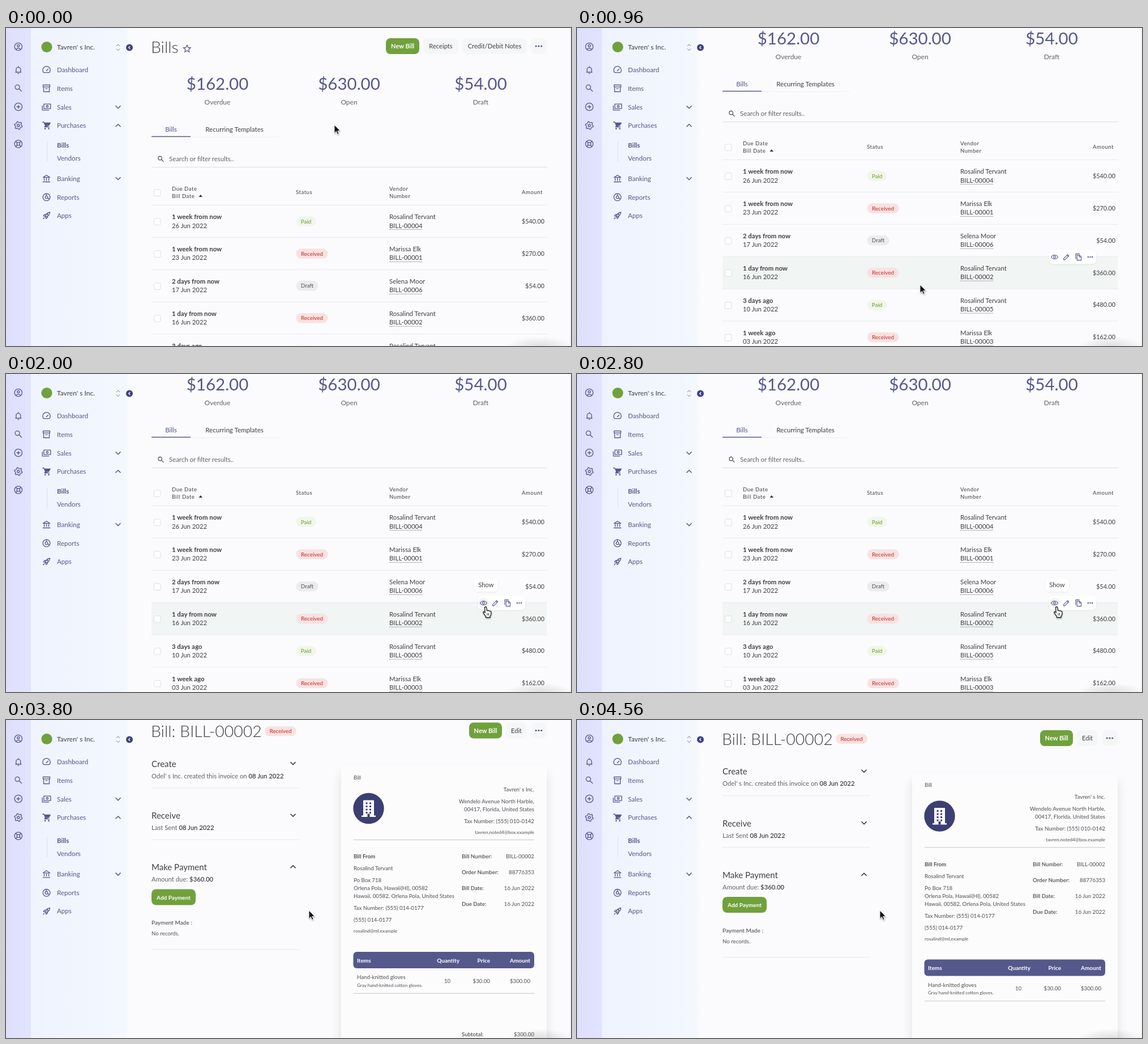
Write an HTML page that moves like this. It is 998 px wide and 561 px high and loops after 5 s.

```html
<!DOCTYPE html>
<html lang="en">
<head>
<meta charset="utf-8">
<title>Bills</title>
<style>
html, body { margin: 0; width: 100%; height: 100%; overflow: hidden; background: #fbfbfd; }
svg { display: block; width: 998px; height: 561px; }
text { font-family: Lato, "Open Sans", sans-serif; white-space: pre; }
</style>
</head>
<body>
<svg id="stage" viewBox="0 0 998 561" xmlns="http://www.w3.org/2000/svg"></svg>
<script>
const NAVY = '#55588b', DARK = '#3f3f43', GREY = '#626267', GREEN = '#70a13c', LINE = '#e9e9ee';
const COMPANY = "Tavren' s Inc.", VENDOR = 'Rosalind Tervant';

// Drawing helpers
const text = (x, y, s, size = 11.4, color = DARK, weight = 400, anchor = 'start', more = '') =>
  `<text x="${x}" y="${y}" font-size="${size}" fill="${color}" font-weight="${weight}" text-anchor="${anchor}" ${more}>${s}</text>`;
const rect = (x, y, w, h, fill, r = 0, more = '') =>
  `<rect x="${x}" y="${y}" width="${w}" height="${h}" rx="${r}" fill="${fill}" ${more}/>`;
const circle = (x, y, r, fill, more = '') => `<circle cx="${x}" cy="${y}" r="${r}" fill="${fill}" ${more}/>`;
const hline = (x1, x2, y, color = LINE, w = 1, more = '') =>
  `<path d="M${x1} ${y}H${x2}" stroke="${color}" stroke-width="${w}" ${more}/>`;
const ring = (x, y, r) => `M${x - r} ${y}a${r} ${r} 0 1 0 ${2 * r} 0a${r} ${r} 0 1 0 ${-2 * r} 0`;
const icon = (x, y, name, size = 16, color = NAVY, fill = 'none') =>
  `<path transform="translate(${x - size / 2} ${y - size / 2}) scale(${size / 24})" d="${ICONS[name]}"
    fill="${fill}" stroke="${color}" stroke-width="2" stroke-linejoin="round"/>`;
const chevron = (x, y, up, color = NAVY) =>
  `<path d="M${x - 4.5} ${y + (up ? 2.3 : -2.3)}l4.5 ${up ? -4.5 : 4.5}l4.5 ${up ? 4.5 : -4.5}" fill="none" stroke="${color}" stroke-width="1.6"/>`;
const group = (id, body, more = '') => `<g id="${id}" ${more}>${body}</g>`;
const dots = (x, y, r, gap) => [-gap, 0, gap].map(d => circle(x + d, y, r, NAVY)).join('');
const button = (x, y, w, h, label, size = 11, fill = GREEN, color = '#fff', weight = 700) =>
  rect(x, y, w, h, fill, 8) + text(x + w / 2, y + h / 2 + 4, label, size, color, weight, 'middle');
const plainButton = (x, w, label) => button(x, 18, w, 28, label, 11.2, '#f4f7f6', DARK, 400);

const gear = Array.from({ length: 24 }, (_, i) => {
  const a = (i + .5) * Math.PI / 12, r = i % 4 < 2 ? 10.5 : 7.8;
  return (i ? 'L' : 'M') + (12 + r * Math.cos(a)).toFixed(1) + ' ' + (12 + r * Math.sin(a)).toFixed(1);
}).join('') + 'Z';

const ICONS = {
  account: ring(12, 12, 10) + ring(12, 9.5, 3) + 'M6 19c3-4 9-4 12 0',
  bell: 'M4 18h16M6 18v-7a6 6 0 0 1 12 0v7M12 5V2M10 21.5h4',
  search: ring(9.5, 9.5, 6) + 'M14 14L21 21',
  plus: ring(12, 12, 10) + 'M12 7v10M7 12h10',
  gear: gear + ring(12, 12, 3),
  buoy: ring(12, 12, 10) + ring(12, 12, 4) + 'M5 5l4 4M15 15l4 4M19 5l-4 4M9 15l-4 4',
  gauge: 'M4.5 19a10 10 0 1 1 15 0ZM11 15l6-6',
  box: 'M3 3h18v5H3zM4.5 8v13h15V8M9 12.5h6',
  money: 'M5 4h18v12H5zM1 8v12h18' + ring(14, 10, 2.5),
  cart: 'M1 3h4l4 9h9l4-7H6M9 12l-2 4h13' + ring(8.5, 20.5, 1) + ring(18, 20.5, 1),
  bank: 'M3 9l9-6 9 6zM6 11v7M12 11v7M18 11v7M2 21h20',
  donut: ring(12, 12, 9.5) + ring(12, 12, 3.5) + 'M12 2.5v6M15 14l5 3',
  rocket: 'M9 15C9 9 14 4 21 3c0 7-5 12-12 12zM9 14l-5-1 3-4h4M10 15l1 5 4-3v-4M3 21l4-4' + ring(15, 9, 1),
  eye: 'M1 12C6 3.5 18 3.5 23 12C18 20.5 6 20.5 1 12Z' + ring(12, 12, 3.5),
  pencil: 'M3 21v-4L16 4l4 4L7 21zM14 6l4 4',
  copy: 'M8 6h8l5 5v11H8zM15 6v6h6M4 18V2h12',
  person: ring(12, 7.5, 4) + 'M4 20v-2c2-5 14-5 16 0v2z',
  bookmark: 'M5 3h14v18l-7-3.5-7 3.5z',
  tag: 'M2 3h10l10 10-9 9L2 12z' + ring(6.5, 7, 1)
};

const PILLS = {
  Paid: [35, '#f1f6ea', '#6b9a2c'],
  Received: [56, '#f9e2e0', '#bf2b2b'],
  Draft: [39, '#ececee', '#505055']
};
function pill(x, y, status) {
  const [w, bg, fg] = PILLS[status];
  return rect(x, y - 9, w, 17.5, bg, 8.7) + text(x + w / 2, y + 3.3, status, 9.9, fg, 400, 'middle');
}

function sidebar() {
  const rail = ['account', 'bell', 'search', 'plus', 'gear', 'buoy']
    .map((n, i) => icon(21.8, [33, 74, 106, 139, 172, 204.5][i], n)).join('');
  const item = (y, n, label, arrow) => icon(71.5, y, n, 16, NAVY, n === 'cart' ? NAVY : 'none') +
    text(90, y + 4, label, 11.6, NAVY) + (arrow ? chevron(198, y, arrow === 'up') : '');
  return rect(44, 0, 174, 561, 'url(#side)') + rect(0, 0, 44, 561, 'url(#rail)') + rail +
    circle(72, 33.5, 9.6, GREEN) + text(90, 38, COMPANY, 12, DARK) +
    '<path d="M195 32l3-3.2l3 3.2M195 36.5l3 3.2l3-3.2" fill="none" stroke="#77798f"/>' +
    circle(218, 34.5, 6, '#3f4180') + '<path d="M219.2 32l-2.5 2.5l2.5 2.5" fill="none" stroke="#fff" stroke-width="1.3"/>' +
    item(74, 'gauge', 'Dashboard') + item(106.5, 'box', 'Items') +
    item(139.5, 'money', 'Sales', 'down') + item(172, 'cart', 'Purchases', 'up') +
    group('submenu', '<path d="M72.5 200v36" stroke="#dcdeee"/>' +
      text(90, 210.5, 'Bills', 11.6, NAVY, 700) + text(90, 234, 'Vendors', 11.6, NAVY) +
      item(265.5, 'bank', 'Banking', 'down') + item(298.5, 'donut', 'Reports') + item(331, 'rocket', 'Apps'));
}

const ROW_TOP = 312.5, ROW_H = 56.9;
const BILLS = [
  ['1 week from now', '26 Jun 2022', 'Paid', VENDOR, 4, 540],
  ['1 week from now', '23 Jun 2022', 'Received', 'Marissa Elk', 1, 270],
  ['2 days from now', '17 Jun 2022', 'Draft', 'Selena Moor', 6, 54],
  ['1 day from now', '16 Jun 2022', 'Received', VENDOR, 2, 360],
  ['3 days ago', '10 Jun 2022', 'Paid', VENDOR, 5, 480],
  ['1 week ago', '03 Jun 2022', 'Received', 'Marissa Elk', 3, 162]
];
const checkbox = y => rect(261.5, y - 6, 11.5, 11.5, '#fff', 2, 'stroke="#dedee3"');

function billRow([due, date, status, vendor, number, amount], i) {
  const y = ROW_TOP + i * ROW_H;
  return hline(257, 956, y) + checkbox(y + 29.5) +
    text(293, y + 24.5, due, 11.4, DARK, 700) + text(293, y + 40, date, 11.3) +
    pill(512.5, y + 28.8, status) + text(677, y + 24.5, vendor, 11.4) +
    text(677, y + 40, 'BILL-0000' + number, 11.4) +
    hline(677, 735, y + 43, '#77777c', 1, 'stroke-dasharray="1.5 1.2"') +
    text(951, y + 32.3, `$${amount}.00`, 10.8, DARK, 400, 'end');
}

function listPage() {
  const total = (x, sum, label) => text(x, 108.5, sum, 29.5, NAVY, 400, 'middle') + text(x, 134.5, label, 12, GREY, 400, 'middle');
  const head = (x, y, s, anchor) => text(x, y, s, 9.6, DARK, 400, anchor, 'letter-spacing=".5"');
  const star = '<path d="M319.8 30.2l1.9 4.1l4.4 .5l-3.3 3l.9 4.4l-3.9-2.2l-3.9 2.2l.9-4.4l-3.3-3l4.4-.5z" fill="none" stroke="#55588b" stroke-width="1.3"/>';
  return text(256, 43.5, 'Bills', 28.4, DARK, 300) + star +
    button(671, 18, 59, 28, 'New Bill') + plainButton(737, 62, 'Receipts') +
    plainButton(806, 114, 'Credit/Debit Notes') + plainButton(928, 27, '') + dots(941, 32, 1.6, 4.8) +
    total(373.5, '$162.00', 'Overdue') + total(606, '$630.00', 'Open') + total(838.5, '$54.00', 'Draft') +
    text(291.5, 182.5, 'Bills', 11.6, NAVY, 400, 'middle') + text(403.5, 182.5, 'Recurring Templates', 11.6, DARK, 400, 'middle') +
    hline(326, 482, 192.5, '#efeff3') + hline(257, 326, 191.5, NAVY, 1.6) +
    icon(273.5, 231, 'search', 13, DARK) + text(288, 234.5, 'Search or filter results..', 11.4, GREY) + hline(257, 956, 245.5, '#dfdfe6') +
    rect(257, 0, 698, ROW_H, '#f1f5f4', 0, 'id="highlight"') +
    checkbox(291) + head(293, 287, 'Due Date') + head(293, 299.5, 'Bill Date') +
    '<path d="M340.5 298h6.5l-3.25-4z" fill="#333"/>' +
    head(512, 293, 'Status') + head(677, 287, 'Vendor') + head(677, 299.5, 'Number') + head(948, 293, 'Amount', 'end') +
    BILLS.map(billRow).join('') +
    group('toolbar', rect(834, -12, 83, 25, '#fff', 7, 'filter="url(#soft)"') +
      circle(843.5, .8, 9, '#f0f2f3', 'id="eyeHover"') +
      icon(843.5, .8, 'eye', 13) + icon(864.5, .8, 'pencil', 13) + icon(885.5, .8, 'copy', 13.5) + dots(906.5, .8, 1.2, 3.6));
}

function popup() {
  const note = (y, s, size = 11.2) => text(415, y, s, size);
  const mark = (y, n) => icon(400, y, n, 17, '#b3b4c8');
  return '<path d="M669 433l6 6l-6 6z" fill="#dadbfd"/>' + rect(372, 317, 299, 243, '#dcddfe', 7) +
    mark(351, 'person') + text(415, 347.5, 'BILL-00002', 11.2, DARK, 700) + note(363, VENDOR, 11.4) + hline(415, 501, 366.5, '#66666f') +
    pill(597, 344.5, 'Received') +
    mark(405, 'bookmark') + note(401, 'Bill marked as received!') + note(416.5, '6 days ago') +
    mark(465, 'tag') + note(454, 'Hand-knitted gloves') + note(469.5, '$30.00', 10.8) + note(485, 'Gray hand-knitted cott...') +
    text(400, 532.5, '$', 19, '#b3b4c8', 400, 'middle') + note(522.5, 'Paid') + note(538, 'Due') +
    text(652, 538, '$360.00', 10.8, DARK, 600, 'end');
}

function detailPage() {
  const section = (y, title, sub, value, up) => text(257, y + 5, title, 15) + chevron(507, y - 1, up, '#333') +
    text(257, y + 25, `${sub} <tspan fill="#2e2e32" font-weight="500">${value}</tspan>`, 11.3, GREY);
  const small = (x, y, s, anchor = 'start', weight = 400, size = 9.7, color = '#4f4f54') => text(x, y, s, size, color, weight, anchor);
  const pair = (y, label, value) => small(805, y, label, 'start', 600) + small(933, y, value, 'end');
  const head = (x, s, anchor) => small(x, 441, s, anchor, 700, 10, '#fff');
  const windows = [0, 1, 2, 3].map(r => [0, 1].map(c => rect(635.5 + c * 6.5, 159 + r * 5.5, 3, 3, '#3c3f72')).join('')).join('');
  const avatar = circle(640.5, 169.5, 27.2, '#3c3f72') + rect(631, 155, 19, 28, '#fff', 1) + rect(628, 182, 25, 2.5, '#fff') +
    windows + rect(638.5, 179, 4, 5.5, '#3c3f72');
  return text(256, 43.5, 'Bill: BILL-00002', 28.4, DARK, 300) + pill(457, 33.5, 'Received') +
    button(818, 18, 58, 28, 'New Bill') + plainButton(883, 37, 'Edit') + plainButton(928, 27, '') + dots(941, 32, 1.6, 4.8) +
    section(91, 'Create', "Odel' s Inc. created this invoice on", '08 Jun 2022') + hline(257, 518, 133.5) +
    section(182.5, 'Receive', 'Last Sent', '08 Jun 2022') + hline(257, 518, 224.5) +
    section(273.5, 'Make Payment', 'Amount due:', '$360.00', true) +
    button(257, 312, 78, 28, 'Add Payment', 10) +
    small(257, 374.5, 'Payment Made :', 'start', 500, 10.1) + small(257, 393.5, 'No records.') + hline(257, 518, 418.5) +
    rect(592, 94, 363, 720, '#fcfcfd', 5, 'filter="url(#card)"') +
    small(614, 118, 'Bill') + avatar +
    small(933, 139, COMPANY, 'end') + small(933, 160, 'Wendelo Avenue North Harble,', 'end') +
    small(933, 174, '00417, Florida, United States', 'end') + small(933, 195, 'Tax Number: (555) 010-0142', 'end') +
    small(933, 214, 'tavren.noted4@box.example', 'end', 400, 8.4) + hline(614, 933, 224.8, '#c6c6ca') +
    small(614, 257.5, 'Bill From', 'start', 700) + small(614, 278.5, VENDOR) + small(614, 299.5, 'Po Box 718') +
    small(614, 313.5, 'Orlena Pola, Hawaii(HI), 00582') + small(614, 327.5, 'Hawaii, 00582, Orlena Pola, United States') +
    small(614, 348.5, 'Tax Number: (555) 014-0177') + small(614, 369.5, '(555) 014-0177') +
    small(614, 388.5, 'rosalind@ml.example', 'start', 400, 8.4) +
    pair(257.5, 'Bill Number:', 'BILL-00002') + pair(285.5, 'Order Number:', '88776353') +
    pair(313.5, 'Bill Date:', '16 Jun 2022') + pair(341.5, 'Due Date:', '16 Jun 2022') +
    rect(613.5, 422.5, 319.5, 29, NAVY, 6) + head(620, 'Items') + head(801, 'Quantity', 'end') + head(855, 'Price', 'end') + head(926, 'Amount', 'end') +
    small(620, 470.5, 'Hand-knitted gloves') + small(620, 484, 'Gray hand-knitted cotton gloves.', 'start', 400, 8.1) +
    small(779.5, 477, '10', 'middle') + small(855, 477, '$30.00', 'end') + small(926, 477, '$300.00', 'end') +
    hline(614, 933, 495.8, '#c6c6ca') +
    pair(571.5, 'Subtotal:', '$300.00') + hline(805, 933, 578, '#c6c6ca') +
    pair(597, 'VAT (20%):', '$60.00') + hline(805, 933, 603.5, '#c6c6ca') + pair(623, 'Total:', '$360.00');
}

const arrow = '<path d="M0 0V14.5L3.4 11.3L5.6 16.6L8 15.6L5.8 10.4H10.4Z" fill="#111" stroke="#fff" stroke-width=".9"/>';
const hand = '<path d="M-1.5 .5q1.5-1.5 3 0l1 6q2-.8 2.5 .4q2-.6 2.5 .6q2.3-.5 2.5 1.5l-.5 5l-1.5 2.5v2h-7.5v-2l-4.5-6q-.8-2 1-2l2.2 1.5z" fill="#fff" stroke="#222" stroke-width="1.3"/><path d="M3 11v4M5.5 11v4" stroke="#222"/>';

document.getElementById('stage').innerHTML = `<defs>
  <linearGradient id="rail"><stop stop-color="#dedffd"/><stop offset="1" stop-color="#e2e3fd"/></linearGradient>
  <linearGradient id="side"><stop stop-color="#eff3fe"/><stop offset=".95" stop-color="#f3f7fe"/><stop offset="1" stop-color="#fafbfd"/></linearGradient>
  <radialGradient id="shade"><stop stop-opacity=".11"/><stop offset=".6" stop-opacity=".05"/><stop offset="1" stop-opacity="0"/></radialGradient>
  <filter id="soft" x="-20%" y="-40%" width="140%" height="180%"><feDropShadow dx="0" dy="1" stdDeviation="1.5" flood-opacity=".08"/></filter>
  <filter id="card" x="-20%" y="-10%" width="140%" height="120%"><feDropShadow dx="0" dy="14" stdDeviation="9" flood-opacity=".11"/></filter>
  <filter id="drop" x="-60%" y="-60%" width="240%" height="240%"><feDropShadow dx=".5" dy="1.5" stdDeviation="1.2" flood-opacity=".35"/></filter>
  </defs>` + rect(0, 0, 998, 561, '#fbfbfd') +
  group('list', listPage()) + group('detail', detailPage()) + group('popup', popup()) +
  group('tip', rect(827.5, 361, 41, 23, '#fff', 6, 'filter="url(#soft)"') + text(848, 376, 'Show', 11.2, DARK, 400, 'middle')) +
  sidebar() + '<ellipse cx="943" cy="561" rx="58" ry="16" fill="url(#shade)"/>' + rect(996.5, 0, 1.5, 561, '#f1f1f3') +
  group('cursor', group('arrow', arrow) + group('hand', hand), 'filter="url(#drop)"');

// Motion: [time, value, ...] keys, eased between neighbours
const SCROLL_LIST = [[130, 0], [400, 80]];
const SCROLL_DETAIL = [[3740, 0], [3790, 13.5], [3825, 13.5], [3840, 27], [3890, 27], [3995, 67.5], [4028, 67.5], [4130, 100], [4500, 100], [4555, 0]];
const CURSOR = [[560, 580, 171], [950, 606, 453], [1025, 606, 453], [1060, 695, 436], [1665, 695, 436], [1960, 847, 411], [3330, 847, 411], [3740, 535, 336]];
const clamp = v => Math.max(0, Math.min(1, v));
const ramp = (t, from, to) => clamp((t - from) / (to - from));
const smooth = p => p * p * (3 - 2 * p);
function track(keys, t) {
  const i = keys.findIndex(k => k[0] > t);
  if (i === 0) return keys[0].slice(1);
  if (i < 0) return keys[keys.length - 1].slice(1);
  const [a, b] = [keys[i - 1], keys[i]], p = smooth(ramp(t, a[0], b[0]));
  return a.slice(1).map((v, j) => v + (b[j + 1] - v) * p);
}

const el = id => document.getElementById(id);
const set = (id, name, value) => el(id).setAttribute(name, value);
const show = (id, alpha) => { set(id, 'opacity', alpha); set(id, 'visibility', alpha > 0 ? 'visible' : 'hidden'); };

function draw(t) {
  const [scroll] = track(SCROLL_LIST, t), [detailScroll] = track(SCROLL_DETAIL, t), [x, y] = track(CURSOR, t);
  const opened = t >= 2900;
  const row = Math.floor((y + scroll - ROW_TOP) / ROW_H);
  const hovered = !opened && row >= 0 ? 1 : 0, rowY = ROW_TOP + row * ROW_H;
  const onEye = !opened && t >= 1930;

  set('list', 'transform', `translate(0 ${-scroll})`);
  show('list', opened ? 0 : 1);
  set('detail', 'transform', `translate(0 ${-detailScroll})`);
  show('detail', opened ? ramp(t, 2880, 3000) : 0);
  set('submenu', 'transform', `translate(0 ${opened ? 6.3 : 0})`);

  show('highlight', hovered);
  set('highlight', 'y', rowY);
  show('toolbar', hovered);
  set('toolbar', 'transform', `translate(0 ${rowY})`);
  show('eyeHover', hovered && onEye ? 1 : 0);
  show('tip', opened ? 0 : ramp(t, 1930, 2000));
  show('popup', ramp(t, 1090, 1240) * (1 - ramp(t, 1700, 1800)));

  const pointing = (t >= 1050 && t < 1700) || onEye;
  show('hand', pointing ? 1 : 0);
  show('arrow', pointing ? 0 : 1);
  set('cursor', 'transform', `translate(${x} ${y})`);
}

const start = performance.now();
function frame() {
  draw((performance.now() - start) % 5000);
  requestAnimationFrame(frame);
}
frame();
</script>
</body>
</html>
```
